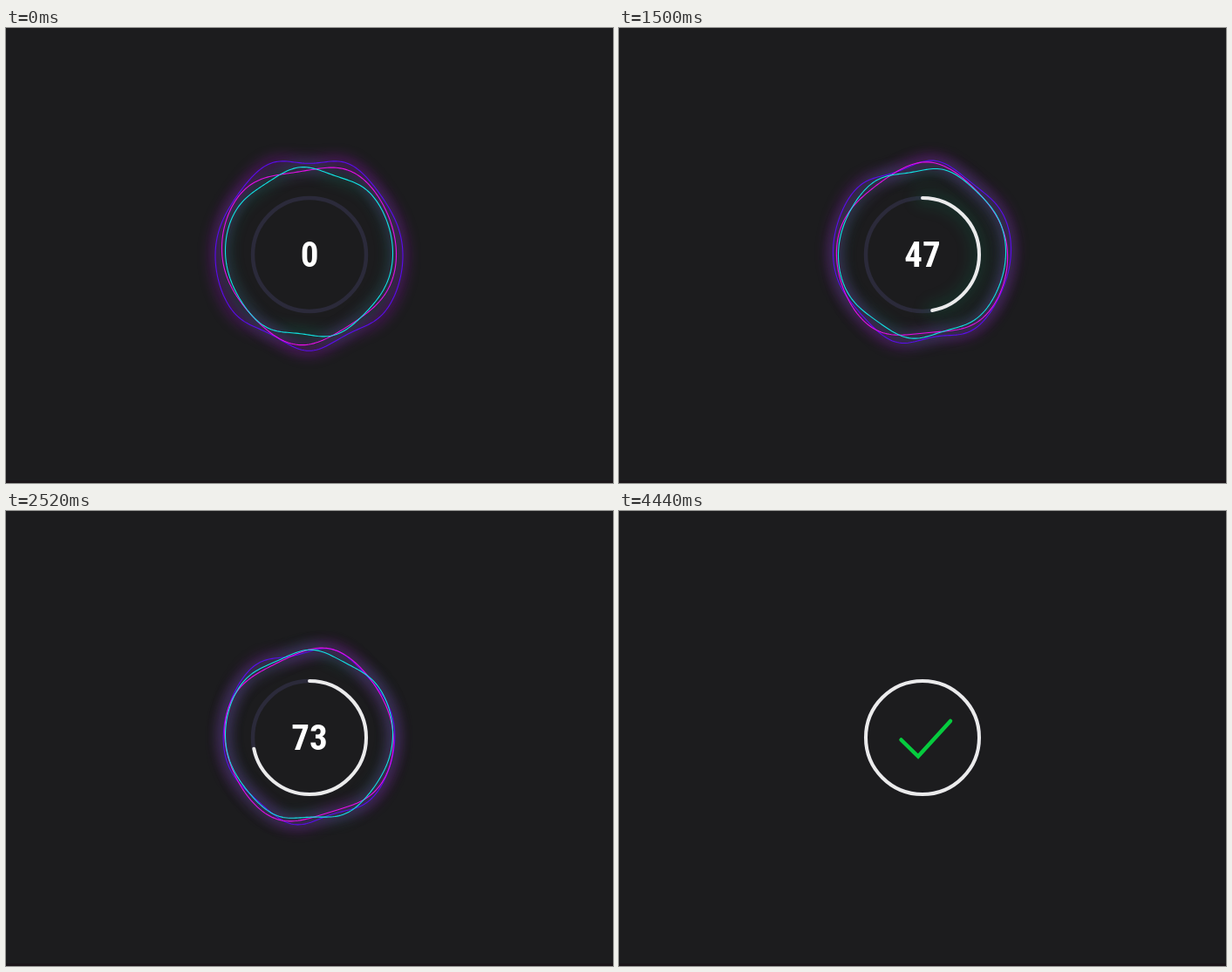
An HTML page with a canvas for the animation above (5100 ms loop, 696x522 px).

```html
<!DOCTYPE html>
<html lang="en">
<head>
<meta charset="utf-8">
<title>Progress ring</title>
<style>
  html, body { margin: 0; height: 100%; overflow: hidden; background: #1c1c1e; }
  canvas { display: block; }
</style>
</head>
<body>
<canvas width="696" height="522"></canvas>
<script>
const ctx = document.querySelector('canvas').getContext('2d');
const LOOP = 5100, STEP = 30, CX = 348, CY = 260, RING = 65;

// Radius, amplitude and length in px, period in ms, phase in cycles
const waves = [
  { color: '#5a0cf0', glow: '#a010c8', glowAlpha: .3, from: 107.5, amp: 4.8, length: 95, period: 900, phase: 0 },
  { color: '#e80ce8', glow: '#a020c0', glowAlpha: .13, from: 100, amp: 6.3, length: 145, period: 900, phase: -.105 },
  { color: '#10e4e4', glow: '#108060', glowAlpha: .28, from: 96, amp: 2.8, length: 84, period: 275, phase: .37 }
];

const clamp = x => Math.min(1, Math.max(0, x));
const linear = (t, start, end) => clamp((t - start) / (end - start));
const easeInOut = (t, start, end) => (1 - Math.cos(Math.PI * linear(t, start, end))) / 2;
const easeOut = (t, start, end) => Math.sin(Math.PI / 2 * linear(t, start, end));

function stroke(path, color, width, alpha = 1, blur = 0) {
  if (alpha <= 0) return;
  ctx.save();
  ctx.globalAlpha = alpha;
  ctx.strokeStyle = color;
  ctx.lineWidth = width;
  ctx.lineCap = 'round';
  if (blur) ctx.filter = `blur(${blur}px)`;
  ctx.stroke(path);
  ctx.restore();
}

function arc(part) {
  const path = new Path2D();
  path.arc(CX, CY, RING, -Math.PI / 2, (2 * part - .5) * Math.PI);
  return path;
}

// A circle whose points are shifted vertically by a wave running along x
function wavePath({ from, amp, length, period, phase }, t) {
  const path = new Path2D();
  const radius = from + (96 - from) * linear(t, 0, 3150);
  for (let i = 0; i < 240; i++) {
    const angle = i / 120 * Math.PI;
    const x = radius * Math.cos(angle);
    const shift = amp * Math.cos(2 * Math.PI * (x / length - t / period - phase));
    path.lineTo(347.5 + x, 258 + radius * Math.sin(angle) + shift);
  }
  path.closePath();
  return path;
}

function drawWaves(t) {
  const alpha = 1 - linear(t, 3480, 3780);
  if (!alpha) return;
  const paths = waves.map(wave => wavePath(wave, t));
  waves.forEach((wave, i) => stroke(paths[i], wave.glow, 13, wave.glowAlpha * alpha, 7));
  waves.forEach((wave, i) => stroke(paths[i], wave.color, 1.1, alpha));
}

function drawRing(t) {
  const part = .47 * easeInOut(t, 215, 1485) + .26 * easeInOut(t, 1420, 2690)
    + .27 * easeInOut(t, 3050, 3600);
  const pulse = Math.sin(Math.PI * t / 1250) ** 2 * (1 - linear(t, 3810, 4290));
  stroke(arc(1), '#2b2a3a', 4.5);
  if (!part) return;
  stroke(arc(part), '#00a870', 18, .38 * pulse, 8);
  stroke(arc(part), '#ebebeb', 4);
}

function drawCount(t) {
  const count = 47 * easeInOut(t, 460, 1090) + 26 * easeInOut(t, 1500, 2220)
    + 27 * easeInOut(t, 3050, 3500);
  ctx.globalAlpha = 1 - linear(t, 3600, 3780);
  ctx.fillStyle = '#fff';
  ctx.textAlign = 'center';
  ctx.font = 'bold condensed 41px "Roboto Condensed", Roboto, sans-serif';
  ctx.fillText(Math.round(count), CX, 273.5);
  ctx.globalAlpha = 1;
}

function drawCheck(t) {
  const done = easeOut(t, 3820, 4440);
  if (!done) return;
  const length = 83.5;
  ctx.strokeStyle = '#06cb3e';
  ctx.lineWidth = 4.5;
  ctx.lineCap = 'round';
  ctx.setLineDash([length * done, 2 * length]);
  ctx.stroke(new Path2D('M323.5 262.5 L343 281.5 L380 241'));
  ctx.setLineDash([]);
}

function draw(now) {
  const t = Math.floor(now % LOOP / STEP) * STEP;
  ctx.fillStyle = '#1c1c1e';
  ctx.fillRect(0, 0, 696, 522);
  ctx.fillStyle = '#1b1519';
  ctx.fillRect(0, 519, 696, 3);
  drawWaves(t);
  drawRing(t);
  drawCount(t);
  drawCheck(t);
}

const start = performance.now();
(function frame() {
  draw(performance.now() - start);
  requestAnimationFrame(frame);
})();
</script>
</body>
</html>
```
